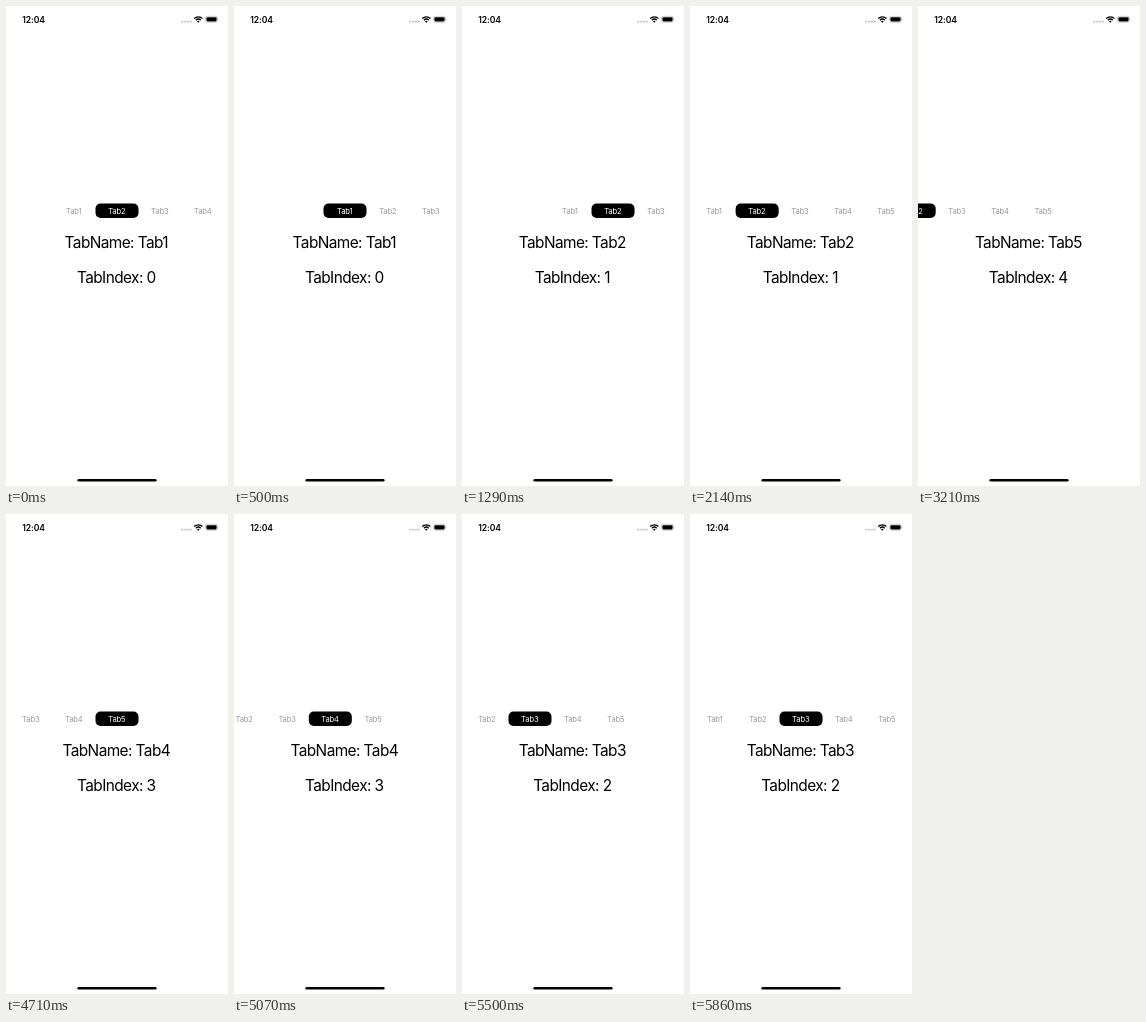
An HTML page that plays this animation: 222x480 px, repeating every 5.93 s.

```html
<!DOCTYPE html>
<html lang="en">
<head>
<meta charset="utf-8">
<title>Tab scroller</title>
<style>
  html, body { margin: 0; width: 100%; height: 100%; overflow: hidden; background: #fff; }
  svg { display: block; width: 222px; height: 480px; }
  text { font-family: Inter, "Liberation Sans", sans-serif; }
  .label { font-size: 15.4px; letter-spacing: -0.58px; text-anchor: middle; }
  .tab { font-size: 7.6px; letter-spacing: -0.15px; text-anchor: middle; }
  .clock { font-size: 8.6px; font-weight: 600; letter-spacing: -0.1px; }
</style>
</head>
<body>
<svg viewBox="0 0 222 480">
  <rect width="222" height="480" fill="#fff"/>
  <g transform="translate(.3 .4)">
    <text class="clock" x="16" y="16.4">12:04</text>
    <g fill="#c4c4c4">
      <rect x="175" y="14.3" width="2" height="1.8" rx=".6"/>
      <rect x="177.8" y="14.3" width="2" height="1.8" rx=".6"/>
      <rect x="180.6" y="14.3" width="2" height="1.8" rx=".6"/>
      <rect x="183.4" y="14.3" width="2" height="1.8" rx=".6"/>
    </g>
    <g fill="none" stroke="#000" stroke-width="1.3">
      <path d="M187.9 12.1a5.8 5.8 0 0 1 8.2 0"/>
      <path d="M189.6 13.8a3.4 3.4 0 0 1 4.8 0"/>
    </g>
    <path d="M192 16.4l-1.3 -1.4a1.9 1.9 0 0 1 2.6 0z"/>
    <rect x="199.2" y="9.9" width="12" height="6" rx="1.8" fill="none" stroke="#aaa" stroke-width=".6"/>
    <rect x="200.1" y="10.8" width="10.2" height="4.2" rx="1.1"/>
    <path d="M211.9 12q1 .9 0 1.8z" fill="#999"/>
  </g>
  <g id="strip"></g>
  <text class="label" id="name" x="110.3" y="241.6"></text>
  <text class="label" id="index" x="110.3" y="277.2"></text>
  <rect x="71.4" y="473" width="79.2" height="2.6" rx="1.3"/>
</svg>
<script>
const LOOP = 5930, STEP = 1000 / 14, PITCH = 43, MID = 111;
const NS = "http://www.w3.org/2000/svg";
const byId = id => document.getElementById(id);

function add(parent, tag, attrs) {
  const el = document.createElementNS(NS, tag);
  for (const key in attrs) el.setAttribute(key, attrs[key]);
  return parent.appendChild(el);
}

const strip = byId("strip");
const pill = add(strip, "rect", { y: 197.5, width: PITCH, height: 14.4, rx: 5 });
const tabs = [0, 1, 2, 3, 4].map(i => {
  const el = add(strip, "text", { class: "tab", x: i * PITCH - 0.2, y: 207.7 });
  el.textContent = "Tab" + (i + 1);
  return el;
});

// Taps, in screen steps: label changes, pill jumps, then the strip glides.
const taps = [
  { label: 0, pill: 1, glide: 2, from: 1, tab: 0 },
  { label: 15, pill: 16, glide: 17, from: 0, tab: 1 },
  { label: 45, pill: 46, glide: 46, from: 3.67, tab: 4 },
  { label: 66, pill: 68, glide: 68, from: 4, tab: 3 },
  { label: 75, pill: 77, glide: 77, from: 3, tab: 2 }
];

// Steps are shown on a 10 ms clock.
function stepAt(ms) {
  const k = Math.floor((ms + 5) / STEP);
  return Math.round(k * STEP / 10) * 10 > ms ? k - 1 : k;
}

function latest(key, k, first) {
  return taps.reduce((tab, tap) => k >= tap[key] ? tap.tab : tab, first);
}

function dragged(k) {
  if (k < 29) return 1.02;
  if (k < 30) return 1.35;
  const u = Math.min(1, (k - 30) / 4);
  return 2.02 + 1.65 * (1 - Math.pow(1 - u, 2.2));
}

function scrollAt(k) {
  if (k >= 27 && k < 46) return dragged(k);
  let pos = 1;
  for (const tap of taps) {
    if (k < tap.glide) break;
    const u = Math.max(0, Math.min(1, ((k - tap.glide) * STEP - 20) / 320));
    pos = tap.from + (tap.tab - tap.from) * u * u * (3 - 2 * u);
  }
  return pos;
}

function draw(ms) {
  const k = stepAt(ms);
  const named = latest("label", k, 0), active = latest("pill", k, 1);
  strip.setAttribute("transform", `translate(${MID - scrollAt(k) * PITCH} 0)`);
  pill.setAttribute("x", (active - 0.5) * PITCH);
  tabs.forEach((el, i) => el.setAttribute("fill", i === active ? "#fff" : "#999"));
  byId("name").textContent = "TabName: Tab" + (named + 1);
  byId("index").textContent = "TabIndex: " + named;
}

const start = performance.now();
function tick() {
  draw((performance.now() - start) % LOOP);
  requestAnimationFrame(tick);
}
tick();
</script>
</body>
</html>
```
